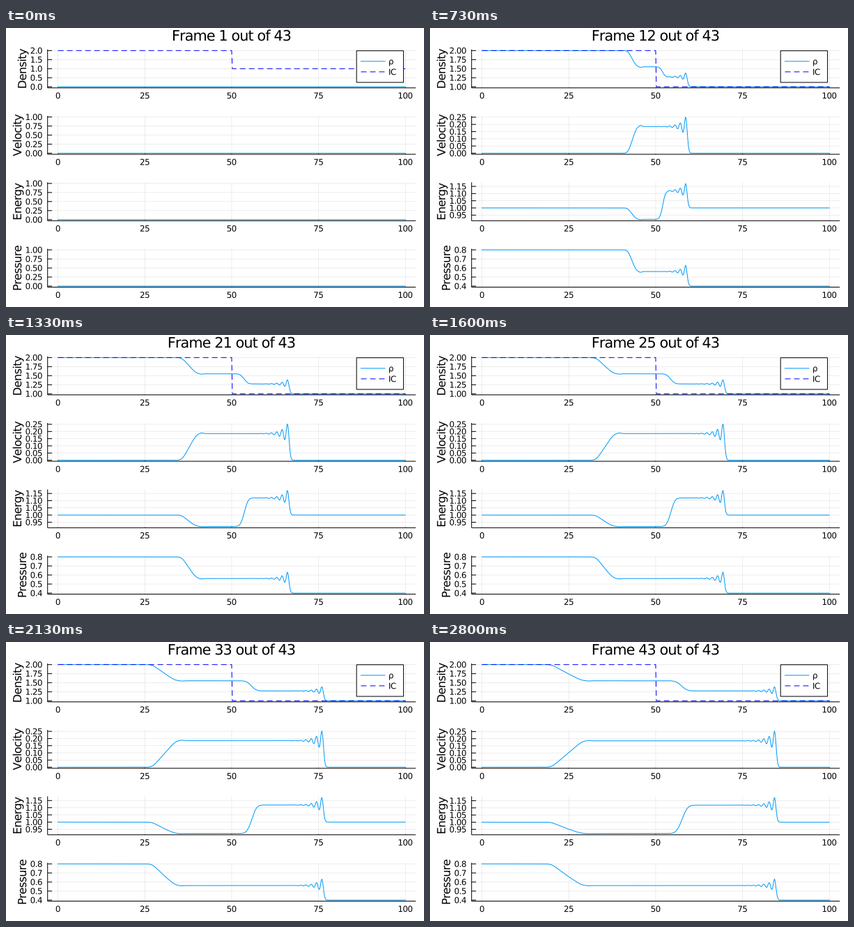
A matplotlib script for the animation above (2870 ms loop, 600 px wide and 400 px high).

```python
import math

import matplotlib.pyplot as plt
import numpy as np
from matplotlib.animation import FuncAnimation
from matplotlib.collections import LineCollection
from matplotlib.patches import PathPatch, Rectangle
from matplotlib.path import Path
from matplotlib.textpath import TextPath

W, H, DPI = 600, 400, 100
PX = 72 / DPI
STEPS, STEP_MS, LOOP_MS, TICK_MS = 43, 200 / 3, 2870, 10

# Layout in pixels: four equal plot areas, each axis widened by 3 %
LEFT, RIGHT, TOP, PLOT_H, PITCH = 59.7, 588.19, 30.795, 55.05, 95.25
MARGIN = 0.03 / 1.06
X0 = LEFT + MARGIN * (RIGHT - LEFT)
X_SCALE = (RIGHT - LEFT) / 106
TICK = 0.012
EM, TRACKING = 1.48, -0.042
NAMES = ("Density", "Velocity", "Energy", "Pressure")
BLUE = "#009afa"

# Shock tube: gas at rest, density 2 | 1, unit internal energy, gamma = 1.4
C0 = math.sqrt(0.56)
U_STAR, SHOCK, TAIL = 0.1853, 0.867, 0.5259
x = np.linspace(0, 100, 501)
initial = np.where(x <= 50, 2.0, 1.0)
erf = np.vectorize(math.erf)


def cdf(z):
    return 0.5 * (1 + erf(z / math.sqrt(2)))


def soft_ramp(d, s):
    """max(d, 0) smoothed by a Gaussian of width s."""
    z = d / s
    return s * np.exp(-z * z / 2) / math.sqrt(2 * math.pi) + d * cdf(z)


def shock_side(t):
    """Plateau with a damped wave train trailing the shock."""
    eta = 50 + SHOCK * t - 0.53 - x
    amp = 0.070 - 0.04 / t
    decay, k = 0.46 + 1.5 / t, 2 * math.pi / 1.53
    back = np.maximum(eta, 0)
    train = np.exp(-decay * back) * (np.cos(k * back) + decay / k * np.sin(k * back))
    front = (U_STAR + amp) * np.exp(-(eta / 0.64) ** 2)
    return np.where(eta < 0, front, U_STAR + amp * train)


def rarefaction(t):
    """Rise from 0 to 1 with a small overshoot past the tail."""
    head, tail = 50 - C0 * t, 50 - TAIL * t
    s = 0.3 * t ** 0.3
    rise = (soft_ramp(x - head, s) - soft_ramp(x - tail, s)) / (tail - head)
    reach = t ** (1 / 3)
    bump = np.exp(-((x - tail - 0.52 * reach) / (0.25 * reach)) ** 2)
    return rise + 0.05 * t ** -0.8 / U_STAR * bump


def state(n):
    if n == 0:
        return [np.zeros_like(x)] * 4
    t = 0.952 * n + 0.08
    u = shock_side(t) * rarefaction(t)
    mix = cdf((x - 50 - U_STAR * t) / (0.2 * math.sqrt(t)))
    c_left, c_right = 1 - 0.2 * u / C0, 1 + 0.2 * u / C0
    rho = (1 - mix) * 2 * c_left ** 5 + mix * c_right ** 5
    p = (1 - mix) * 0.8 * c_left ** 7 + mix * 0.4 * c_right ** 7
    energy = p / (0.4 * rho) + u * u / 2
    return [rho, u, energy, p]


states = [state(n) for n in range(STEPS)]

plt.rcParams["font.family"] = "DejaVu Sans"
fig = plt.figure(figsize=(W / DPI, H / DPI), dpi=DPI, facecolor="white")
ax = fig.add_axes([0, 0, 1, 1])
ax.set_xlim(0, W)
ax.set_ylim(H, 0)
ax.axis("off")


def to_px(v):
    return X0 + X_SCALE * np.asarray(v)


def unit_path(s):
    return TextPath((0, 0), s, size=1)


BAR_END = unit_path("|").get_extents().x1
outlines = {}


def outline(s):
    """Tightly tracked text at unit size, with its width."""
    if s not in outlines:
        pen, parts = 0, []
        for ch in s:
            glyph = unit_path(ch)
            if len(glyph.vertices):
                parts.append(Path(glyph.vertices + [pen, 0], glyph.codes))
            pen += unit_path(ch + "|").get_extents().x1 - BAR_END + TRACKING
        outlines[s] = Path.make_compound_path(*parts), pen - TRACKING
    return outlines[s]


class Label:
    """Outlined text on a baseline; align is 0 left, 0.5 centre, 1 right."""

    def __init__(self, size=8, align=0.5, upright=False, z=2):
        self.em, self.align, self.upright = size * EM, align, upright
        self.patch = PathPatch(Path([(0, 0)]), fc="black", lw=0, zorder=z, snap=False)
        ax.add_patch(self.patch)

    def put(self, s, tx, ty):
        path, width = outline(s)
        along, up = (path.vertices - [self.align * width, 0]).T * self.em
        verts = (tx - up, ty - along) if self.upright else (tx + along, ty - up)
        self.patch.set_path(Path(np.column_stack(verts), path.codes))
        self.patch.set_visible(True)

    def hide(self):
        self.patch.set_visible(False)


def strokes(segments, grid=False):
    style = dict(colors="#e6e6e6", linewidths=0.7 * PX, zorder=1) if grid else \
        dict(colors="black", linewidths=PX, zorder=2)
    lines = LineCollection(segments, snap=False, **style)
    ax.add_collection(lines, autolim=False)
    return lines


def curve(color=BLUE, z=3, **kw):
    line, = ax.plot([], [], color=color, lw=PX, zorder=z, snap=False, **kw)
    return line


def y_ticks(lo, hi):
    step = next(s for s in (0.05, 0.1, 0.25, 0.5) if (hi - lo) / s <= 5.5)
    first, last = math.ceil(lo / step - 1e-3), math.floor(hi / step + 1e-3)
    return [i * step for i in range(first, last + 1)], 1 if step in (0.1, 0.5) else 2


class Panel:
    def __init__(self, row):
        self.roof = TOP + PITCH * row
        self.floor = floor = self.roof + PLOT_H
        marks = [0, 25, 50, 75, 100]
        strokes([[(v, self.roof), (v, floor)] for v in to_px(marks)], grid=True)
        strokes([[(LEFT, self.roof), (LEFT, floor)], [(LEFT, floor), (RIGHT, floor)]]
                + [[(v, floor), (v, floor - TICK * PLOT_H)] for v in to_px(marks)])
        for m in marks:
            Label().put(str(m), to_px(m), floor + 15.3)
        self.title = NAMES[row]
        self.name = Label(11, upright=True)
        self.grid = strokes([], grid=True)
        self.ticks = strokes([])
        self.labels = [Label(align=1) for _ in range(7)]
        self.line = curve()

    def scale(self, v, lo, hi):
        part = (np.asarray(v) - lo) / (hi - lo)
        return self.floor - PLOT_H * (MARGIN + part / 1.06)

    def show(self, data, lo, hi):
        if hi == lo:
            hi = lo + 1
        self.line.set_data(to_px(x), self.scale(data, lo, hi))
        values, digits = y_ticks(lo, hi)
        ys = self.scale(values, lo, hi)
        tick_end = LEFT + TICK * (RIGHT - LEFT)
        self.grid.set_segments([[(LEFT, y), (RIGHT, y)] for y in ys])
        self.ticks.set_segments([[(LEFT, y), (tick_end, y)] for y in ys])
        for label in self.labels:
            label.hide()
        for label, v, y in zip(self.labels, values, ys):
            label.put(f"{v:.{digits}f}", 52.5, y + 4.3)
        self.name.put(self.title, 22 if digits == 2 else 29, (self.roof + self.floor) / 2)
        return hi


panels = [Panel(row) for row in range(4)]
title = Label(14)
dash = dict(color="#0000ff", linestyle=(0, (8, 5)))
ic_line = curve(z=4, **dash)

box_right, box_top, row_h = RIGHT - (RIGHT - LEFT) / 30, TOP + PLOT_H / 30, 15.12
ax.add_patch(Rectangle((503.2, box_top), box_right - 503.2, 3 * row_h, fc="white",
                       ec="black", lw=PX, zorder=5, snap=False))
for i, (name, style) in enumerate((("ρ", {}), ("IC", dash)), 1):
    y = box_top + i * row_h
    curve(z=6, **style).set_data([509.5, 544], [y, y])
    Label(align=0, z=6).put(name, 549, y + 4.3)


def update(i):
    n = min(int((i * TICK_MS + 5) / STEP_MS), STEPS - 1)
    title.put(f"Frame {n + 1} out of {STEPS}", (LEFT + RIGHT) / 2, 18.14)
    for row, (panel, data) in enumerate(zip(panels, states[n])):
        lo, hi = data.min(), data.max()
        if row == 0:
            lo, hi = min(lo, 1.0), max(hi, 2.0)
        hi = panel.show(data, lo, hi)
        if row == 0:
            ic_line.set_data(to_px(x), panel.scale(initial, lo, hi))
    return []


anim = FuncAnimation(fig, update, frames=LOOP_MS // TICK_MS, interval=TICK_MS,
                     init_func=lambda: update(0), repeat=True, repeat_delay=0,
                     blit=False)
plt.show()
```
